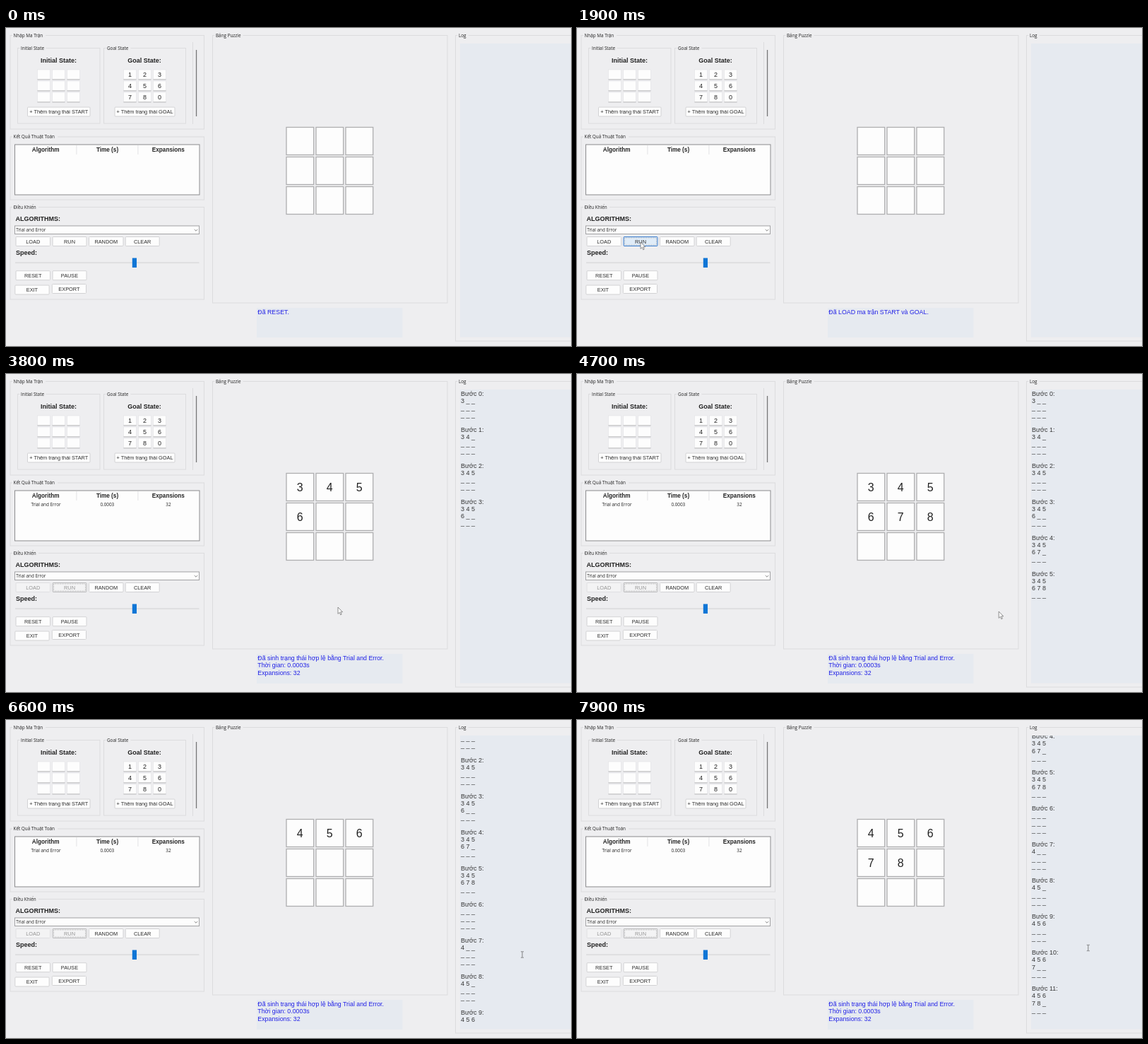
These frames come from a looping animation (800 by 450 pixels, 8000 ms). An HTML page:

```html
<!DOCTYPE html>
<html lang="vi">
<head>
<meta charset="utf-8">
<title>Puzzle</title>
<style>
  html, body { margin: 0; width: 100%; height: 100%; overflow: hidden; background: #eeeef0; }
  svg { display: block; width: 800px; height: 450px; font-family: "Liberation Sans", Arial, sans-serif; fill: #222; }
  .ui { font: 6.35px "Open Sans", "Noto Sans", sans-serif; }
  .bold { font-size: 9px; font-weight: bold; }
  .head { font-size: 8.2px; font-weight: bold; }
  .mid { text-anchor: middle; }
  .frame { fill: none; stroke: #dcdcde; }
  .btn rect { fill: #fdfdfd; stroke: #d2d2d4; }
  .btn text { font-size: 7.35px; text-anchor: middle; fill: #2c2c2c; }
  .btn .dots { display: none; fill: none; stroke: #777; stroke-width: .5; stroke-dasharray: .7 .7; }
  .btn.focus .dots { display: inline; }
  .btn.hot rect:first-child { fill: #e0ecf8; stroke: #3c7fd0; }
  .btn.off rect:first-child { fill: #f3f3f4; stroke: #e0e0e2; }
  .btn.off text { fill: #949494; }
  .btn.off.focus rect:first-child { stroke: #bbbbbd; }
  .entry { font-size: 9px; }
  .tile { font-size: 16px; }
  #status { font-size: 8.82px; fill: #2222e6; }
  #log { font-size: 9px; fill: #363636; }
</style>
</head>
<body>
<svg viewBox="0 0 800 450">
  <clipPath id="view"><rect x="643" y="22" width="157" height="415.5"/></clipPath>
  <g id="base"></g>
  <g id="row" class="ui mid">
    <text x="56.5" y="186.5">Trial and Error</text>
    <text x="143.3" y="186.5">0.0003</text>
    <text x="230" y="186.5">32</text>
  </g>
  <g id="board" class="tile mid"></g>
  <g id="status"></g>
  <g clip-path="url(#view)"><g id="log"></g></g>
  <path id="arrow" d="M0 0V9.4L2.2 7.4L3.7 10.8L5.2 10.1L3.7 6.8H6.6Z" fill="#fbfbfb" stroke="#666" stroke-width=".7"/>
  <path id="beam" d="M-2-4.2H-.5L0-3.8L.5-4.2H2M0-3.8V3.8M-2 4.2H-.5L0 3.8L.5 4.2H2" fill="none" stroke="#666" stroke-width=".8"/>
</svg>
<script>
const $ = id => document.getElementById(id);
const LOOP = 8000, LOAD_AT = 1000, RUN_AT = 2050, STEP = 500, SCROLL = 150, LINE = 10.2;

const text = (x, y, s, cls = "") => `<text x="${x}" y="${y}" class="${cls}">${s}</text>`;
const rect = (x, y, w, h, attrs) => `<rect x="${x}" y="${y}" width="${w}" height="${h}" ${attrs}/>`;
const grid = draw => [...Array(9).keys()].map(i => draw(i % 3, Math.floor(i / 3), i)).join("");

function frame(x, y, w, h, label, gap) {
  return rect(x, y, w, h, 'class="frame"') +
    rect(x + 3, y - 3, gap, 6, 'fill="#eeeef0"') + text(x + 4.5, y + 2.2, label, "ui");
}
function button(x, y, w, label, id = "") {
  return `<g class="btn" id="${id}">` + rect(x, y, w, 13, 'rx="1"') +
    rect(x + 1.5, y + 1.5, w - 3, 10, 'class="dots"') + text(x + w / 2, y + 9.2, label) + "</g>";
}
function entries(x, values) {
  return grid((c, r, i) => {
    const ex = x + c * 21, ey = 59 + r * 16;
    return rect(ex, ey, 18, 14, 'fill="#fdfdfd" stroke="#e2e2e4" stroke-width=".6"') +
      rect(ex, ey + 13.5, 18, .8, 'fill="#a9a9ab"') +
      text(ex + 9, ey + 10.4, values[i] || "", "entry mid");
  });
}

$("base").innerHTML =
  frame(6, 10.5, 274.5, 132.5, "Nhập Ma Trận", 47) +
  frame(16.5, 28.5, 116.5, 106.5, "Initial State", 37) +
  frame(138.5, 28.5, 116, 106.5, "Goal State", 35) +
  rect(264, 20, 1, 116, 'fill="#dcdcde"') + rect(268.9, 31, 1.3, 94, 'fill="#777"') +
  frame(6, 154, 274.5, 89, "Kết Quả Thuật Toán", 64) +
  frame(6, 253.5, 274.5, 130.5, "Điều Khiển", 37) +
  frame(292.5, 10.5, 332.5, 378.5, "Bảng Puzzle", 40) +
  frame(636.5, 10.5, 180, 432.5, "Log", 15) +
  text(74.5, 48.6, "Initial State:", "bold mid") + text(196, 48.6, "Goal State:", "bold mid") +
  entries(44.5, "") + entries(166.5, "123456780") +
  button(30.5, 112, 88.5, "+ Thêm trạng thái START") +
  button(154, 112, 85, "+ Thêm trạng thái GOAL") +
  rect(12.5, 165, 261.5, 71, 'fill="#fdfdfd" stroke="#8c8c8e"') +
  rect(99.5, 166, .8, 13, 'fill="#dedee0"') + rect(186.5, 166, .8, 13, 'fill="#dedee0"') +
  text(56.2, 174.8, "Algorithm", "head mid") + text(143.5, 174.8, "Time (s)", "head mid") +
  text(229.8, 174.8, "Expansions", "head mid") +
  text(13.5, 273.3, "ALGORITHMS:", "bold") +
  rect(12.5, 280, 261, 11.5, 'fill="#fdfdfd" stroke="#a2a2a4"') +
  text(14.3, 288.3, "Trial and Error", "ui") +
  '<path d="M266.8 285L269 287.2L271.2 285" fill="none" stroke="#555" stroke-width=".7"/>' +
  button(14, 295.5, 48.5, "LOAD", "load") + button(66, 295.5, 48, "RUN", "run") +
  button(117.5, 295.5, 48.5, "RANDOM") + button(169.2, 295.5, 48, "CLEAR") +
  text(14, 321.4, "Speed:", "bold") +
  rect(13, 331, 260.5, 2.2, 'fill="#dfdfe1"') + rect(178.8, 325.5, 6.2, 13.5, 'fill="#0f76d6"') +
  button(14, 343.7, 48.5, "RESET") + button(66, 343.7, 48, "PAUSE") +
  button(12.8, 364, 48.3, "EXIT") + button(65.3, 362.5, 48.2, "EXPORT") +
  grid((c, r) => rect(397 + c * 42, 140.5 + r * 42, 38.7, 39, 'fill="#fdfdfd" stroke="#aeaeb0" stroke-width="1.3"')) +
  rect(355, 396, 206.5, 42, 'fill="#e6eaf0"') + rect(643, 22, 157, 415.5, 'fill="#e6eaf0"');

// Each attempt fills the grid in order from its first digit.
function tiles(k) {
  const first = k < 6 ? 3 : 4, count = k < 6 ? k + 1 : k - 6;
  return Array.from({ length: 9 }, (_, i) => i < count ? first + i : "");
}
function logStep(k) {
  const cells = tiles(k).map(v => v === "" ? "_" : v);
  const lines = [`Bước ${k}:`, ...[0, 3, 6].map(i => cells.slice(i, i + 3).join(" "))];
  return lines.map((s, i) => text(644, 30.7 + (k * 5 + i) * LINE, s)).join("");
}
const scrollEnd = k => Math.max(0, (k + 1) * 5 * LINE - 403.5);

const messages = [
  ["Đã RESET."],
  ["Đã LOAD ma trận START và GOAL."],
  ["Đã sinh trạng thái hợp lệ bằng Trial and Error.", "Thời gian: 0.0003s", "Expansions: 32"]
];

// Pointer stops: time, x, y
const path = [
  [400, 46, 332], [700, 43.8, 302], [1250, 43.8, 302], [1600, 90, 303], [2200, 90, 303],
  [2700, 93, 311.5], [3000, 93, 311.5], [3800, 470, 330], [4400, 597.2, 336], [4800, 597.2, 336],
  [5400, 724, 333], [5750, 737, 332], [6250, 737, 332], [6600, 731, 332], [7300, 728, 330], [7800, 723.8, 322.5]
];
function pointer(t) {
  const i = path.findIndex(p => p[0] > t);
  if (i < 0) return path[path.length - 1].slice(1);
  if (i === 0) return null;
  const [a, b] = [path[i - 1], path[i]];
  const u = (t - a[0]) / (b[0] - a[0]), e = u * u * (3 - 2 * u);
  return [a[1] + (b[1] - a[1]) * e, a[2] + (b[2] - a[2]) * e];
}

const over = (p, x) => !!p && p[0] >= x && p[0] <= x + 48 && p[1] >= 295 && p[1] <= 309;
const show = (el, on) => el.setAttribute("display", on ? "inline" : "none");
let lastStep, lastPhase;

function draw(now) {
  const t = now % LOOP;
  const phase = t < LOAD_AT ? 0 : t < RUN_AT ? 1 : 2;
  const step = phase < 2 ? -1 : Math.floor((t - RUN_AT) / STEP);

  if (phase !== lastPhase) {
    lastPhase = phase;
    $("status").innerHTML = messages[phase].map((s, i) => text(356.3, 405.2 + i * LINE, s)).join("");
    show($("row"), phase === 2);
  }
  if (step !== lastStep) {
    lastStep = step;
    const values = step < 0 ? [] : tiles(step);
    $("board").innerHTML = grid((c, r, i) => text(416.3 + c * 42, 165.7 + r * 42, values[i] || ""));
    $("log").innerHTML = Array.from({ length: step + 1 }, (_, k) => logStep(k)).join("");
  }
  if (step >= 0) {
    const u = Math.min(1, (t - RUN_AT - step * STEP) / SCROLL);
    const from = scrollEnd(step - 1), y = from + (scrollEnd(step) - from) * u;
    $("log").setAttribute("transform", `translate(0 ${-y})`);
  }

  const p = pointer(t), inLog = !!p && p[0] > 643, off = phase === 2;
  const runFocus = t >= 1900;
  for (const [id, x, focus] of [["load", 14, t >= LOAD_AT - 100 && !runFocus], ["run", 66, runFocus]]) {
    const list = $(id).classList;
    list.toggle("off", off);
    list.toggle("hot", !off && over(p, x));
    list.toggle("focus", focus);
  }
  show($("arrow"), p && !inLog);
  show($("beam"), inLog);
  if (p) $(inLog ? "beam" : "arrow").setAttribute("transform", `translate(${p[0]} ${p[1]})`);
}

const start = performance.now();
function tick() {
  draw(performance.now() - start);
  requestAnimationFrame(tick);
}
tick();
</script>
</body>
</html>
```
